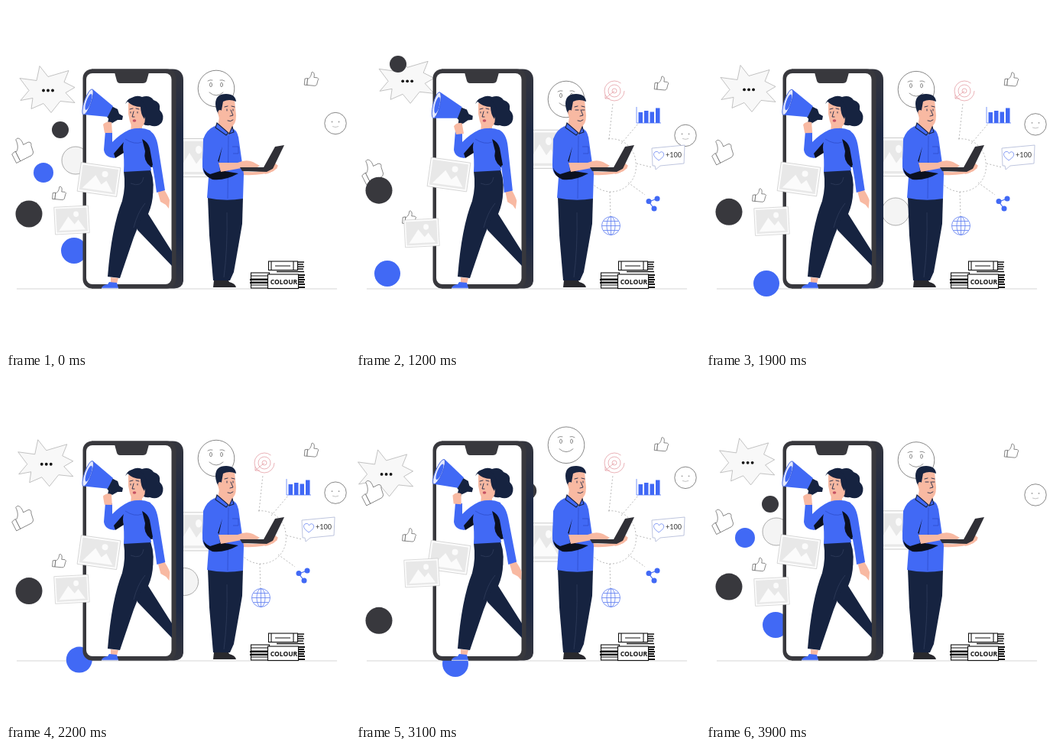
Write an HTML page that moves like this. It is 450 px wide and 450 px high and loops after 4 s.

```html
<!DOCTYPE html>
<html lang="en">
<head>
<meta charset="utf-8">
<title>Social media marketing</title>
<style>
html, body { margin: 0; width: 100%; height: 100%; overflow: hidden; background: #fff; }
svg { display: block; width: 100vw; height: 100vh; }
.line { fill: #fff; stroke: #555; stroke-width: .7; stroke-linejoin: round; }
.line path { vector-effect: non-scaling-stroke; }
.blue { fill: #4169f5; }
.navy { fill: #162340; }
.skin { fill: #f8b9a2; }
.dark { fill: #38383d; }
.ink { fill: none; stroke: #1c2747; stroke-width: .9; stroke-linecap: round; }
.seam { fill: none; stroke: #2c4ac4; stroke-width: .7; }
.dash { fill: none; stroke: #888; stroke-width: .6; stroke-dasharray: 2 2.4; }
.book { fill: #fff; stroke: #111; stroke-width: 1.1; }
</style>
</head>
<body>
<svg viewBox="0 0 450 450">
  <defs>
    <linearGradient id="side" x1="0" y1="0" x2="0" y2="1">
      <stop offset="0" stop-color="#34353d"/><stop offset=".3" stop-color="#1d2945"/>
      <stop offset=".75" stop-color="#1d2945"/><stop offset="1" stop-color="#34353d"/>
    </linearGradient>
    <g id="thumb" class="line">
      <path d="M-10 1L-6 0V10H-10Z"/>
      <path d="M-6 1C-3 0-1-4-1-9C2-11 4-7 3-2H8Q11-1 9 2L8 8Q7 10 5 10H-6Z"/>
    </g>
    <g id="pic">
      <rect x="-26" y="-19" width="52" height="38" fill="#fcfcfc" stroke="#c8c8c8" stroke-width=".7"/>
      <rect x="-23.500" y="-16.500" width="47" height="33" fill="#e8e8e8"/>
      <path d="M-20 14L-5-5L4 6L10 0L20 14Z" fill="#fbfbfb"/>
      <circle cx="7" cy="-8" r="4" fill="#fbfbfb"/>
    </g>
  </defs>

  <path d="M14 370H433" stroke="#c4c4c4" stroke-width=".7"/>

  <g id="burst">
    <path d="M-10-32L1-18L28-26L22-11L36-4L24 3L36 16L17 14L5 29L-5 17L-21 24L-19 10L-35 13L-24 0L-36-16L-14-13Z" fill="#f8f8f8" stroke="#a9a9a9" stroke-width=".7"/>
    <g fill="#111"><circle cx="-5" r="1.900"/><circle cx="1" r="1.900"/><circle cx="7" r="1.900"/></g>
  </g>
  <g id="thumbL"><use href="#thumb" transform="rotate(-27) scale(1.45)"/></g>
  <g id="thumbR"><use href="#thumb" transform="rotate(5) scale(.87)"/></g>
  <circle id="badge" r="17.500" class="dark"/>

  <g id="picBack"><use href="#pic" transform="scale(1 1.320)"/></g>
  <g id="face">
    <circle r="23.800" class="line"/>
    <g fill="none" stroke="#777" stroke-width=".8" stroke-linecap="round">
      <ellipse cx="-7" cy="-5" rx="1.500" ry="2.800"/><ellipse cx="7" cy="-5" rx="1.500" ry="2.800"/>
      <path d="M-11-10Q-8-12-5-11M5-11Q8-12 11-10M-9 5Q0 13 9 5"/>
    </g>
  </g>
  <g id="faceS">
    <circle r="14.200" class="line"/>
    <g fill="#999"><circle cx="-4.500" cy="-2" r=".9"/><circle cx="4.500" cy="-2" r=".9"/></g>
    <path d="M-4 4Q0 6 4 4" fill="none" stroke="#aaa" stroke-width=".7"/>
  </g>
  <g id="thumbT"><use href="#thumb" transform="rotate(5) scale(.9)"/></g>

  <circle id="disc" r="18" fill="#f4f4f4" stroke="#999" stroke-width=".8"/>
  <circle id="discDark" r="11" class="dark"/>
  <circle id="discBlue" r="13" class="blue"/>
  <circle id="discBig" r="17" class="blue"/>

  <!-- phone -->
  <path d="M112 82.500H218Q232 83 232 97V360Q231 369 220 369.500H112Z" fill="url(#side)"/>
  <rect x="100.500" y="82.500" width="122" height="287" rx="12" class="dark"/>
  <rect x="105" y="88" width="111.500" height="276" rx="8" fill="#fff"/>
  <path d="M142 87H187L184 98Q183 101 179 101H149Q146 101 145 98Z" class="dark"/>

  <!-- woman -->
  <path d="M187 214Q198 245 186 272L217 321V340L172 293Q162 270 162 240Z" class="navy"/>
  <path d="M154 216L189 214Q196 234 190 255Q176 279 167 303L149 356L133 354Q138 290 152 255Q157 236 154 216Z" class="navy"/>
  <path d="M163 232Q178 238 180 224M167 290Q172 270 182 258" fill="none" stroke="#33405f" stroke-width=".7"/>
  <path d="M137 355L147 356L145 363L137 362Z" class="skin"/>
  <path d="M135 361L145 362L147 369H125Q126 365 133 364Z" class="blue"/>
  <path d="M125 369.300H147" stroke="#dfe5ff" stroke-width="1"/>
  <path d="M180 172Q190 176 190 190L196 210L189 211L178 208Z" fill="#0b1020"/>
  <g id="arm">
    <path d="M198 241L206 239Q212 248 214 254L213 265L209 260L202 256Z" class="skin"/>
    <path d="M185 162Q196 165 199 184L208 241L197 244Q193 210 186 188Z" class="blue"/>
  </g>
  <path d="M164 151L178 154L178 165L163 165Z" class="skin"/>
  <path d="M161 162Q176 157 189 163Q192 178 187 196L190 215L154 217Q155 200 153 187L142 199Q129 198 128 188L130 163L139 164V178Q150 167 161 162Z" class="blue"/>
  <path d="M141 193L154 178Q152 184 154 192L143 199ZM178 174Q186 178 188 186L192 208L189 210Q179 202 182 190Z" fill="#0b1020"/>
  <path d="M156 174Q168 182 178 178" class="seam"/>
  <path d="M160 125Q167 115 178 119Q188 116 193 123Q203 126 201 136Q208 143 204 152Q198 160 188 156Q178 158 175 146Z" class="navy"/>
  <path d="M160 127Q170 121 178 129L182 147Q182 158 173 160Q164 159 162 151L160 141Z" class="skin"/>
  <path d="M156 128Q160 118 171 120Q181 122 184 136L181 148Q176 141 176 132Q166 132 159 125Z" class="navy"/>
  <path d="M162 135L166 134M170 134L174 135M167 138L165 145L168 145" class="ink"/>
  <g id="eyesW"><path d="M163 138.500V140M172 138.500V140" class="ink"/></g>
  <ellipse cx="168" cy="150" rx="2.300" ry="1.700" fill="#c75364"/>
  <g id="horn">
    <path d="M135 144L140 144L137 160L131 161Z" class="navy"/>
    <path d="M127 155Q131 150 138 152L139 166H129Z" class="skin"/>
    <path d="M138 131L146 135L148 141L153 144L152 149L146 149L139 153L132 145Z" class="navy"/>
    <path d="M113 108.500L140 131L133 145L101.500 142Z" class="blue"/>
    <ellipse cx="107" cy="125.500" rx="4.500" ry="17.500" transform="rotate(19 107 125.500)" fill="#e4e9fd" stroke="#3457d9" stroke-width=".8"/>
    <ellipse cx="108" cy="125.500" rx="3" ry="11" transform="rotate(19 108 125.500)" class="blue"/>
  </g>

  <g id="picL"><use href="#pic" transform="rotate(8)"/></g>
  <g id="picS"><use href="#pic" transform="rotate(-3) scale(.86 .94)"/></g>

  <!-- icons that fan out of the laptop -->
  <g id="fan">
    <path class="dash" d="M330 174A32 32 0 0 1 366 205A33 33 0 0 1 334 243A33 33 0 0 1 306 228M331 174L336 127M347 180L369 154M367 206L387 211M356 231L378 247M332 243L333 275"/>
    <g fill="none" stroke="#e5a0a6" stroke-width=".8">
      <circle cx="338" cy="111" r="13" stroke-dasharray="70 12"/><circle cx="338" cy="111" r="8"/>
      <circle cx="338" cy="111" r="3"/><path d="M338 111L326 121M326 116V121H332"/>
    </g>
    <path d="M367 132V153H399" fill="none" stroke="#4169f5" stroke-width=".7"/>
    <path d="M369.500 139h5.500v14h-5.500zM377 137h5.500v16h-5.500zM384.500 138.500h5.500v14.500h-5.500zM392 133.500h5.500v19.500h-5.500z" class="blue"/>
    <path d="M387 186L430 182L429 206L398 209L392 214L391 209L388 209Z" fill="#fff" stroke="#a3acd0" stroke-width=".7"/>
    <path d="M396 202Q386 195 391 191Q395 189 396.500 193Q399 189 402 192Q405 196 396 202Z" fill="none" stroke="#6c88f2" stroke-width=".8"/>
    <text x="405" y="198" font-size="9" font-family="Lato, sans-serif" fill="#333">+100</text>
    <path d="M394 252L383 256L390 265" fill="none" stroke="#4169f5" stroke-width="1.200"/>
    <g class="blue"><circle cx="394" cy="252" r="3.500"/><circle cx="383" cy="255.500" r="3.500"/><circle cx="390" cy="265" r="3.500"/></g>
    <g fill="none" stroke="#5c7cf0" stroke-width=".8">
      <circle cx="333.500" cy="287.500" r="12"/><ellipse cx="333.500" cy="287.500" rx="5.500" ry="12"/>
      <path d="M333.500 275.500V299.500M321.500 287.500H345.500M323.500 281.500H343.500M323.500 293.500H343.500"/>
    </g>
  </g>

  <!-- man -->
  <path d="M272 359L290 357L292 361Q300 363 301 368H271Z" fill="#29292e"/>
  <path d="M264 250H310L309 285Q303 320 298 348L293 359H271L266 300Z" class="navy"/>
  <path d="M289 270Q290 318 285 355" fill="none" stroke="#33405f" stroke-width=".7"/>
  <path d="M279 146L297 152V166L286 168L277 157Z" class="skin"/>
  <path d="M310 216Q330 220 340 212L351 205L356 209L350 216Q336 222 310 221Z" class="skin"/>
  <path d="M273 157L290 168L298 161Q304 165 305 178L311 220L310 252Q286 256 263 251L265 224Q257 219 257 210L258 174Q262 162 273 157Z" class="blue"/>
  <path d="M276 153L274 159L288 169L291 166ZM296 158L298 165L292 167Z" class="blue" stroke="#162340" stroke-width="1.100"/>
  <path d="M291 170L290 252M296 184H304V193H297" class="seam"/>
  <path d="M283 184L278 206L280 215L304 219Q286 229 270 227Q258 222 258 211Q266 217 274 213Z" fill="#0b1020"/>
  <path d="M258 190Q266 210 278 203L280 216L267 220Q257 216 257 206Z" class="blue"/>
  <path d="M278 205L303 205Q314 200 323 204L332 209L327 212L308 212L281 217Z" class="skin"/>
  <path d="M306 211L337 211L352 184L364 182L349 213L342 217L309 216Z" fill="#303037"/>
  <path d="M341 217L349 213L354 209L355 212Q346 219 338 220Z" class="skin"/>
  <path d="M275 128Q286 117 299 123L301 143Q301 156 294 158Q283 157 279 148Z" class="skin"/>
  <path d="M274 128Q274 115 288 115Q300 115 301 125Q292 121 284 125L282 136L280 144Q274 137 274 128Z" class="navy"/>
  <ellipse cx="280" cy="140" rx="2.700" ry="4" class="skin"/>
  <path d="M286 132L290 131M295 131L299 132M294 136L297 143L293 144M290 150Q294 152 297 149" class="ink"/>
  <g id="eyesM"><path d="M289 135V137M297 135V137" class="ink"/></g>
  <g id="lidsM"><path d="M287 136H291M295 136H299" class="ink"/></g>

  <!-- books -->
  <g class="book">
    <rect x="343.500" y="334" width="38" height="11.500"/>
    <rect x="320.500" y="349" width="24" height="20"/>
    <path d="M347 334V345M352 340H372M376 334V345M321 353H343M321 357H343M321 361H343M321 365H343"/>
    <path d="M381 335H390M381 338H389M381 341H390M381 344H389M354 347.500H390" stroke-width="1.700"/>
    <rect x="342.500" y="351" width="40" height="18.500"/>
    <path d="M382 352H391M382 355H390M382 358H391M382 361H390M382 364H391M382 368H391M319 358H342M319 362H342" stroke-width="1.800"/>
  </g>
  <text x="363.500" y="363.500" text-anchor="middle" font-size="8.500" font-weight="700" font-family="Noto Sans, sans-serif" style="font-stretch:62.5%" fill="#111">COLOUR</text>
</svg>
<script>
const LOOP = 4000, STEP = 100, TURN = 1950;
const el = id => document.getElementById(id);
const put = (id, x, y) => el(id).setAttribute('transform', `translate(${x} ${y})`);
const turn = (id, a, x, y) => el(id).setAttribute('transform', `rotate(${a} ${x} ${y})`);
const show = (id, on) => el(id).setAttribute('visibility', on ? 'visible' : 'hidden');
const ease = p => p < .5 ? 2 * p * p : 1 - 2 * (1 - p) ** 2;
const clamp = p => Math.min(1, Math.max(0, p));

// id: x, rest y, shift at each end of the swing
const floats = {
  thumbL: [20, 186, 30, -40], thumbR: [70, 244.5, 34, -41], badge: [30, 272, -33, 47],
  picL: [121.5, 227, -7, 8], picS: [86, 280, 18, -26], picBack: [245, 198.500, -12, 17],
  face: [275, 108, 15, -21], faceS: [431, 153.500, 17, -24], thumbT: [400, 95, 6, -9]
};

// closed routes behind the phone: [time, x, y]
const routes = {
  discDark: [[0, 71, 162], [600, 45, 103], [950, 49, 69], [1200, 55, 76], [1900, 120, 102],
    [2600, 190, 132], [3050, 228, 146], [3500, 160, 160], [3900, 84, 165]],
  discBig: [[0, 89, 320], [600, 51, 337], [1200, 41, 350], [1900, 79, 363], [2600, 117, 376],
    [2900, 127, 381], [3100, 130, 374], [3900, 91, 323]],
  discBlue: [[0, 49, 218], [600, 104, 250], [1200, 150, 270], [2400, 190, 250], [3200, 122, 195], [3900, 51, 209]],
  disc: [[0, 91, 202], [600, 125, 225], [1200, 190, 252], [1900, 248, 269], [2600, 195, 255],
    [3200, 140, 220], [3900, 92, 201]]
};

function along(keys, t) {
  const n = keys.length;
  const key = i => {
    const turns = Math.floor(i / n), k = keys[i - turns * n];
    return [k[0] + turns * LOOP, k[1], k[2]];
  };
  let i = n - 1;
  while (keys[i][0] > t) i--;
  const [a, b, c, d] = [key(i - 1), key(i), key(i + 1), key(i + 2)];
  const h = c[0] - b[0], u = (t - b[0]) / h;
  return [1, 2].map(j => {
    const m = (c[j] - a[j]) / (c[0] - a[0]) * h, w = (d[j] - b[j]) / (d[0] - b[0]) * h;
    return b[j] + u * (m + u * (3 * (c[j] - b[j]) - 2 * m - w + u * (2 * (b[j] - c[j]) + m + w)));
  });
}

// quick swing one way, then a softer one back: 0 to 1, then 0 to -1
const wave = t => t < TURN
  ? Math.sin(Math.PI * t / TURN)
  : -(Math.sin(Math.PI * (t - TURN) / (LOOP - TURN)) ** 2);

function draw(t) {
  const s = wave(t);
  const swing = (up, down) => s > 0 ? s * up : -s * down;
  for (const id in floats) {
    const [x, y, up, down] = floats[id];
    put(id, x, y + swing(up, down));
  }
  const d = swing(13, -16);
  put('burst', 54 + d, 110.5 - d);
  for (const id in routes) put(id, ...along(routes[id], t));

  turn('arm', swing(3, -2), 195, 178);
  turn('horn', swing(-6, 4), 150, 146);

  const k = ease(clamp((t - 600) / 550)) * (1 - ease(clamp((t - 3100) / 900)));
  el('fan').setAttribute('transform', `translate(337 203) scale(${k}) translate(-337 -203)`);
  show('fan', k > .001);

  const blink = Math.abs(t - 1200) <= 100 || t === 3900;
  show('eyesM', !blink);
  show('lidsM', blink);
}

function tick() {
  draw(Math.floor(performance.now() % LOOP / STEP) * STEP);
  requestAnimationFrame(tick);
}
tick();
</script>
</body>
</html>
```
